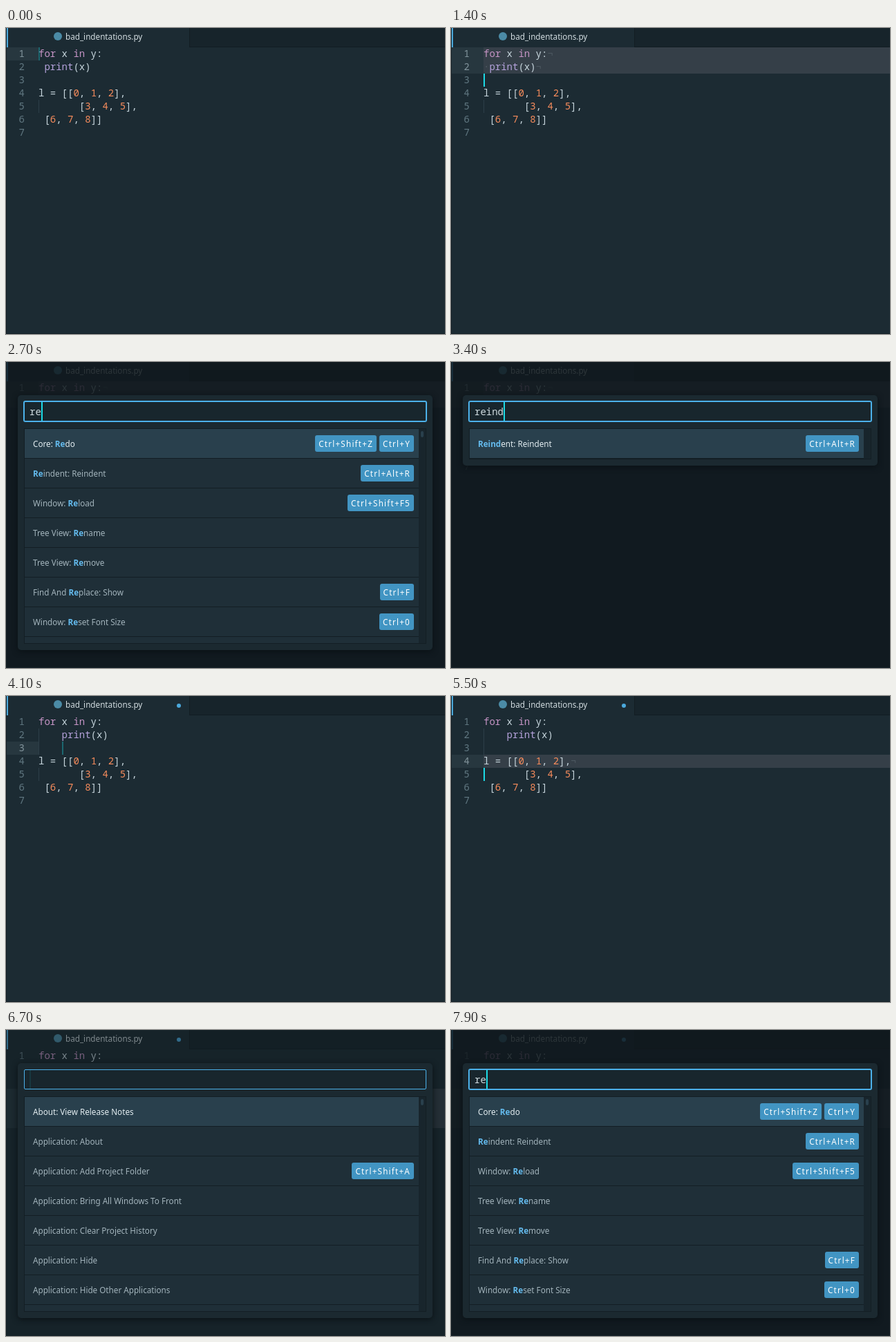
An HTML page that plays this animation: 635 px wide and 443 px high, repeating every 8000 ms.

```html
<!DOCTYPE html>
<html lang="en">
<head>
<meta charset="utf-8">
<title>Reindent</title>
<style>
html, body { margin: 0; width: 100%; height: 100%; overflow: hidden; background: #1c2b33; }
body { position: relative; font: 11.7px/16px "Noto Sans", sans-serif; color: #a3b4bc; }
div { position: absolute; box-sizing: border-box; }
#stage { left: 0; top: 0; width: 635px; height: 443px; overflow: hidden; background: #1c2b33;
  border-left: 1px solid #121d23; border-bottom: 1px solid #152128; }
#stage > * { margin-left: -1px; }

#tabs { left: 265px; top: 0; width: 370px; height: 28px; background: #17242b;
  border-left: 1px solid #121d23; border-bottom: 1px solid #121d23; }
#accent { left: 1px; top: 0; width: 2px; height: 28px; background: #4ba9dc; }
#icon { left: 69px; top: 6px; width: 12px; height: 12px; border-radius: 50%; background: #4b8ba6; }
#title { left: 86px; top: 4px; color: #d3dde1; }
#modified { left: 247px; top: 11px; width: 6px; height: 6px; border-radius: 50%; background: #4ba9dc; }
#rows { left: 0; top: 0; }

.row, #query { font: 14px/19px "Noto Sans Mono", monospace; white-space: pre; }
.row { left: 1px; width: 634px; height: 19px; color: #c6d5dc; }
.row div { top: -1px; height: 19px; }
.row .number { left: 0; width: 26px; text-align: right; color: #607781; }
.row .code { left: 46px; }
.row .band { left: 0; top: 0; width: 46px; background: #27373f; }
.row .selection { left: 46px; top: 0; width: 588px; background: #353f48; }
.row .guide { left: 46px; top: 0; width: 1px; background: #2d3f48; }
.keyword { color: #c594c5; }
.builtin { color: #b5a3dc; }
.digit { color: #f78c5c; }
.hidden-char { color: #4e5a62; }
.active .number { color: #82949c; }
.caret { width: 2px; height: 19px; background: #1cdbe6; }

#shade { left: 0; top: 0; width: 635px; height: 443px; background: #10181d; }
#palette { left: 17px; top: 48px; width: 600px; padding: 48px 9px 9px; border-radius: 5px;
  background: #1b2930; box-shadow: 0 2px 8px #0a1115; }
#input { left: 9px; top: 9px; width: 582px; height: 29px; border: 1px solid #4cb1ea;
  border-radius: 2px; background: #18262d; }
#input.typed { box-shadow: 0 0 0 1px #4cb1ea; }
#query { left: 7px; top: 4px; color: #cfdbe0; }
#input .caret { top: 0; height: 27px; }
#list { position: relative; width: 582px; max-height: 312px; overflow: hidden;
  border: 1px solid #131e24; background: #18252c; }
.item { position: relative; display: flex; align-items: center; gap: 4px; width: 570px; height: 43px;
  padding: 0 7px 0 12px; border-bottom: 1px solid #131e24; background: #1f2f38; white-space: pre; }
.item:first-child { background: #29404d; color: #e3edf1; }
.item span { flex: 1; }
.item b { color: #64bbee; }
.item kbd { font: inherit; font-weight: 500; line-height: 24px; padding: 0 5px; border-radius: 3px;
  letter-spacing: 1.2px; background: #4295c3; color: #fff; }
#thumb { left: 573px; top: 3px; width: 4px; height: 9px; border-radius: 2px; background: #29404d; }
</style>
</head>
<body>
<div id="stage">
  <div id="tabs"></div>
  <div id="accent"></div>
  <div id="icon"></div>
  <div id="title">bad_indentations.py</div>
  <div id="modified"></div>
  <div id="rows"></div>
  <div id="caret" class="caret"></div>
  <div id="shade"></div>
  <div id="palette">
    <div id="input"><div id="query"></div><div id="inputCaret" class="caret"></div></div>
    <div id="list"></div>
  </div>
</div>
<script>
const LOOP = 8000, CHAR = 8.4, LINE = 19;
const $ = id => document.getElementById(id);
const clamp = v => Math.max(0, Math.min(1, v));

const code = ['for x in y:', ' print(x)', '', 'l = [[0, 1, 2],', '       [3, 4, 5],', ' [6, 7, 8]]', ''];
const indented = code.map((line, i) => i === 1 ? '    print(x)' : i === 2 ? '    ' : line);

const commands = [
  ['About: View Release Notes'], ['Application: About'],
  ['Application: Add Project Folder', 'Ctrl+Shift+A'],
  ['Application: Bring All Windows To Front'], ['Application: Clear Project History'],
  ['Application: Hide'], ['Application: Hide Other Applications'], ['']
];
const matches = [
  ['Core: Redo', 'Ctrl+Shift+Z', 'Ctrl+Y'], ['Reindent: Reindent', 'Ctrl+Alt+R'],
  ['Window: Reload', 'Ctrl+Shift+F5'], ['Tree View: Rename'], ['Tree View: Remove'],
  ['Find And Replace: Show', 'Ctrl+F'], ['Window: Reset Font Size', 'Ctrl+0'], ['']
];

// Each step overrides part of the state; `blink` is when the caret was last solid.
const steps = [
  [0, { row: 1, col: 0, from: 1, to: 0, lines: code, query: null, blink: -400 }],
  [600, { row: 2, to: 1 }],
  [1400, { row: 3, to: 2, blink: 1500 }],
  [2200, { query: '', opened: 2200 }],
  [2500, { query: 'r' }],
  [2700, { query: 're' }],
  ...[...'indent'].map((_, i) => [3200 + i * 100, { query: 'reindent'.slice(0, i + 3) }]),
  [3800, { query: null, lines: indented, row: 3, col: 4, to: 0, blink: 3500 }],
  [4500, { row: 4, blink: 4500 }],
  [4700, { col: 0, blink: 4700 }],
  [5500, { row: 5, from: 4, to: 4, blink: 5500 }],
  [5600, { row: 6, to: 5, blink: 5600 }],
  [5800, { row: 7, to: 6, blink: 5800 }],
  [6500, { query: '', opened: 6500 }],
  [7500, { query: 'r' }],
  [7700, { query: 're' }]
];

function paint(line, selected) {
  const body = line.trimStart(), lead = line.length - body.length;
  const hidden = s => `<span class="hidden-char">${s}</span>`;
  const tokens = body.replace(/\b(for|in)\b|(print)|\d/g, (word, keyword, builtin) =>
    `<span class="${keyword ? 'keyword' : builtin ? 'builtin' : 'digit'}">${word}</span>`);
  return (selected ? hidden('·'.repeat(lead)) : ' '.repeat(lead)) + tokens + (selected ? hidden('¬') : '');
}

function rowHtml(line, i, s) {
  const n = i + 1, hasSelection = s.to >= s.from;
  const selected = n >= s.from && n <= s.to;
  const active = selected || (!hasSelection && n === s.row);
  return `<div class="row ${active ? 'active' : ''}" style="top:${28 + i * LINE}px">` +
    (active ? '<div class="band"></div>' : '') +
    (selected ? '<div class="selection"></div>' : '') +
    (/^ {4}/.test(line) ? '<div class="guide"></div>' : '') +
    `<div class="number">${n}</div><div class="code">${paint(line, selected)}</div></div>`;
}

function itemHtml([label, ...keys], query) {
  const text = query ? label.replace(new RegExp('\\b' + query, 'i'), '<b>$&</b>') : label;
  return `<div class="item"><span>${text}</span>${keys.map(k => `<kbd>${k}</kbd>`).join('')}</div>`;
}

function drawState(s) {
  $('rows').innerHTML = s.lines.map((line, i) => rowHtml(line, i, s)).join('');
  $('caret').style.left = 47 + s.col * CHAR + 'px';
  $('caret').style.top = 28 + (s.row - 1) * LINE + 'px';
  const open = s.query !== null;
  $('palette').style.display = $('shade').style.display = open ? '' : 'none';
  if (!open) return;
  const items = !s.query ? commands : s.query.length < 3 ? matches : [matches[1]];
  $('list').innerHTML = items.map(item => itemHtml(item, s.query)).join('') +
    (items.length > 1 ? '<div id="thumb"></div>' : '');
  $('input').className = s.query ? 'typed' : '';
  $('query').textContent = s.query;
  $('inputCaret').style.left = 7.2 + s.query.length * CHAR + 'px';
}

// Solid for 200 ms, then fades out and back in over 600 ms.
function pulse(elapsed) {
  const u = elapsed % 800;
  return u < 200 ? 1 : Math.abs(u - 500) / 300;
}

let drawnStep = -1;
function frame(now) {
  const t = now % LOOP;
  const past = steps.filter(([time]) => time <= t);
  const state = Object.assign({}, ...past.map(step => step[1]));
  if (past.length !== drawnStep) {
    drawnStep = past.length;
    drawState(state);
  }
  $('caret').style.opacity = pulse(Math.max(0, t - state.blink));
  $('modified').style.display = t >= 4100 ? '' : 'none';
  if (state.query !== null) {
    const age = t - state.opened;
    $('shade').style.opacity = 0.85 * clamp(age / 400);
    $('inputCaret').style.opacity = state.query ? 1 : clamp((age - 150) / 550);
  }
  requestAnimationFrame(frame);
}
frame(0);
</script>
</body>
</html>
```
